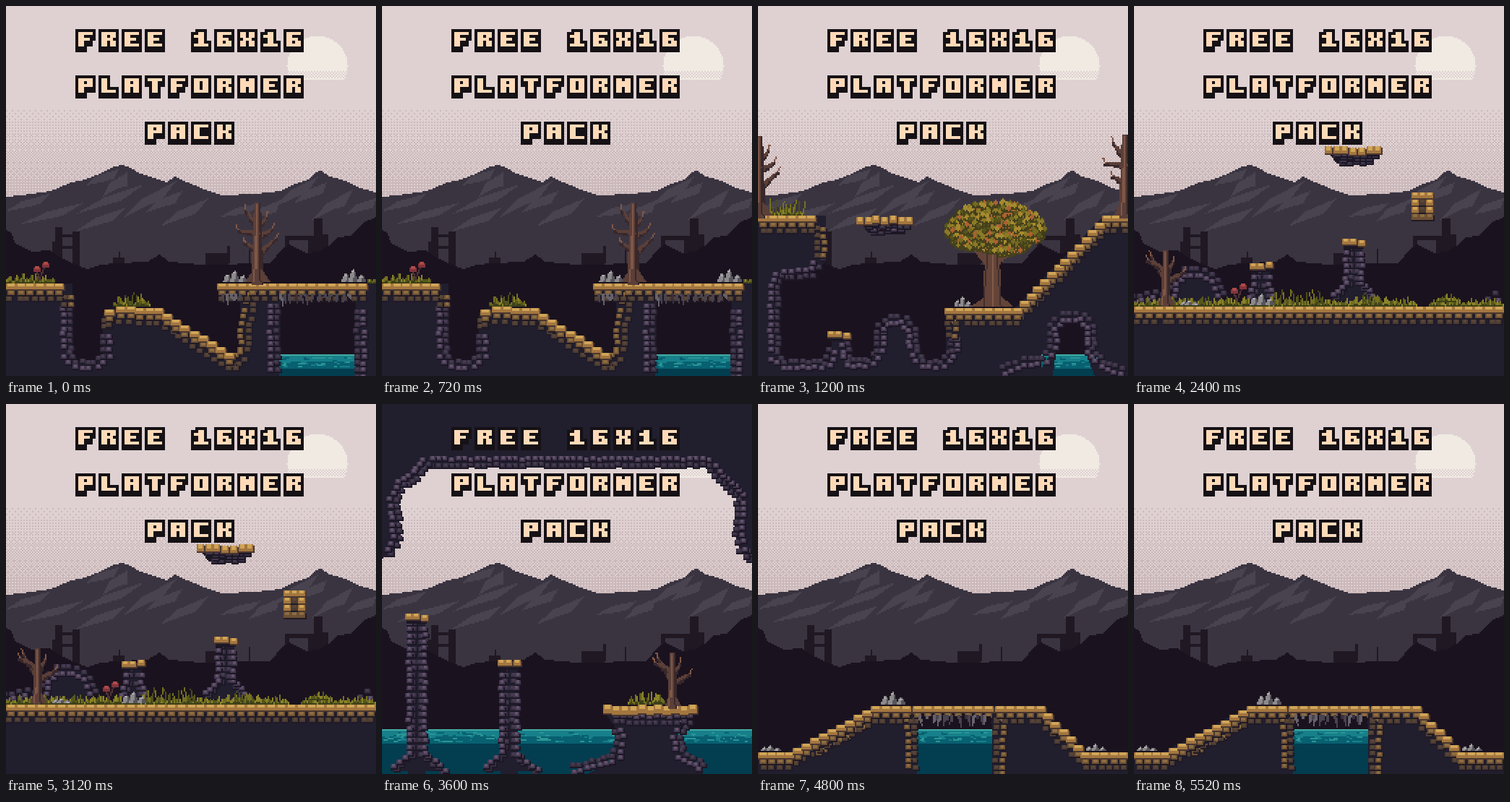
Recreate the animation shown at these times as an HTML page with a canvas. Size 512 px wide and 512 px high, loop 6 s.

```html
<!DOCTYPE html>
<html lang="en">
<meta charset="utf-8">
<title>Free 16x16 platformer pack</title>
<style>
html, body { margin: 0; width: 100%; height: 100%; overflow: hidden; background: #1a121e }
canvas { display: block; width: 512px; height: 512px; image-rendering: pixelated }
</style>
<canvas width="256" height="256" role="img" aria-label="FREE 16X16 PLATFORMER PACK"></canvas>
<script>
const ctx = document.querySelector('canvas').getContext('2d');
const DARK = '#1a121e', EARTH = '#211e2e';
const GOLD = ['#49362f', '#a3763f', '#d0a557'];
const BROWN = ['#211a23', '#6b5035', '#8d6c40'];
const UMBER = ['#1f1a26', '#4a3b34', '#594536'];
const VIOLET = ['#1c1625', '#43384e', '#62526c'];
const SHADE = ['#1c1825', '#352d40', '#463b50'];

let seed;
const rnd = () => (seed = seed * 16807 % 2147483647) / 2147483647;
const pick = list => list[Math.floor(rnd() * list.length)];

function R(color, x, y, w, h) {
  ctx.fillStyle = color;
  ctx.fillRect(Math.round(x), Math.round(y), Math.round(w), Math.round(h));
}

// Scanline fill, so that edges stay hard
function poly(color, p) {
  for (let y = 0; y < 256; y++) {
    const cuts = [];
    for (let i = 0; i < p.length; i += 2) {
      const [x0, y0] = [p[i], p[i + 1]];
      const [x1, y1] = [p[(i + 2) % p.length], p[(i + 3) % p.length]];
      if (y0 <= y + .5 !== y1 <= y + .5) cuts.push(x0 + (y + .5 - y0) / (y1 - y0) * (x1 - x0));
    }
    cuts.sort((a, b) => a - b);
    for (let i = 0; i < cuts.length; i += 2) {
      const x = Math.round(cuts[i]);
      R(color, x, y, Math.round(cuts[i + 1]) - x, 1);
    }
  }
}

function walk(p, step, draw) {
  for (let i = 0; i + 3 < p.length; i += 2) {
    const dx = p[i + 2] - p[i], dy = p[i + 3] - p[i + 1];
    const len = Math.hypot(dx, dy), n = Math.max(1, Math.round(len / step));
    for (let k = 0; k < n; k++)
      draw(p[i] + dx * k / n, p[i + 1] + dy * k / n, -dy / len, dx / len);
  }
}

function limb(color, w0, w1, x0, y0, x1, y1) {
  const n = Math.ceil(Math.hypot(x1 - x0, y1 - y0)) || 1;
  for (let i = 0; i <= n; i++) {
    const k = i / n, w = Math.max(1, Math.round(w0 + (w1 - w0) * k));
    R(color, x0 + (x1 - x0) * k - w / 2, y0 + (y1 - y0) * k, w, Math.min(w, 3));
  }
}

function stone(x, y, w, h, [low, mid, high]) {
  R(low, x, y + 1, w, h - 1);
  R(mid, x, y, w - 1, h - 1);
  R(high, x + 1, y, w - 3, Math.max(1, h >> 1));
}

// Double row of stones along a line
function wall(p, pal = VIOLET, w = 9) {
  const inner = pal === VIOLET ? SHADE : UMBER;
  for (const [off, tone] of [[-w / 4, inner], [w / 4, pal]])
    walk(p, 4.5, (x, y, nx, ny) =>
      stone(x + nx * off - 2.5 + rnd(), y + ny * off - 2 + rnd(), 5, 4, tone));
}

// Walkable edge: gold on top, darker stones beneath
function ledge(p) {
  walk(p, 6, (x, y) => stone(x + rnd() * 2, y + 9, 5, 4, UMBER));
  walk(p, 7, (x, y) => stone(x + 1, y + 5, 6, 4, BROWN));
  walk(p, 7, (x, y) => stone(x, y, 8, 5, GOLD));
}

function cap(x, y, w) {
  R(VIOLET[0], x + 1, y + 4, w - 2, 3);
  walk([x, y, x + w, y], 5.5, (a, b) => stone(a, b + rnd(), 6, 5, GOLD));
}

function pillar(x, y, bottom, flare) {
  R(EARTH, x - 6, y + 4, 12, bottom - y);
  if (flare) poly(EARTH, [x - 4, bottom - 14, x + 4, bottom - 14, x + flare, bottom, x - flare, bottom]);
  wall([x - 4, y + 6, x - 4, bottom - 12, x - flare, bottom], VIOLET, 5);
  wall([x + flare, bottom, x + 4, bottom - 12, x + 4, y + 6], VIOLET, 5);
  cap(x - 8, y, 16);
}

function floating(x, y) {
  poly(SHADE[0], [x + 1, y + 3, x + 38, y + 3, x + 32, y + 13, x + 8, y + 13]);
  wall([x + 31, y + 11, x + 8, y + 11], VIOLET, 5);
  wall([x + 35, y + 7, x + 4, y + 7], VIOLET, 4);
  walk([x, y + 1, x + 40, y + 1], 6, (a, b) => stone(a, b + rnd(), 6, 6, GOLD));
}

function grass(x0, x1, y, tall = 4) {
  for (let x = x0; x < x1; x++) {
    const edge = Math.min(1, (x - x0 + 1) / 5, (x1 - x) / 5);
    const h = 1 + edge * rnd() * tall;
    R('#3d4019', x, y - h / 2, 1, h / 2 + 1);
    R(pick(['#55571c', '#74701f', '#8c8429']), x, y - h, 1, h * .6 + 1);
  }
}

function reeds(x0, x1, y, h) {
  for (let x = x0; x < x1; x += 2 + rnd() * 2)
    limb(pick(['#4c4c1c', '#74701f']), 1, 1, x, y, x + rnd() * 4 - 2, y - h * (.5 + rnd() / 2));
}

function flowers(x, y) {
  for (const [dx, h] of [[0, 8], [6, 11]]) {
    limb('#4e3338', 1, 1, x + 2, y, x + dx, y - h);
    R('#82343b', x + dx - 2, y - h, 5, 3);
    R('#b04a49', x + dx - 1, y - h - 1, 3, 2);
  }
}

function rocks(x, y, w, h) {
  for (const [at, s] of [[0, .7], [.35, 1], [.75, .6]]) {
    const l = x + w * at - w * .15, t = y - h * s, d = w * .5;
    poly('#56545c', [l, y, l + d * .3, t + 1, l + d * .6, t, l + d, y]);
    poly('#8d8a8c', [l, y, l + d * .3, t + 1, l + d * .6, t, l + d * .5, y]);
    R('#b0adae', l + d * .35, t + 1, 2, 1);
  }
}

// Branches: start height, reach, end height, as parts of the tree height
const TALL = [[.36, .24, .56], [.42, -.16, .5], [.58, .19, .68], [.64, -.25, .66], [.72, -.15, .92], [.7, .12, .84]];
const SMALL = [[.5, -.28, .93], [.68, -.34, .84], [.45, .34, .62], [.58, .14, .82]];

function deadTree(x, y, h, branches) {
  const bark = '#5b3f38', lit = '#805747', dim = '#38282b';
  for (const [a, dx, b] of branches) {
    limb(dim, 3, 2, x, y - h * a + 1, x + dx * h, y - h * b + 1);
    limb(bark, 3, 1, x, y - h * a, x + dx * h, y - h * b);
    limb(lit, 1, 1, x + dx * h, y - h * b, x + dx * h * 1.1, y - h * b - 3);
  }
  limb(dim, h * .15, 4, x, y, x, y - h);
  limb(bark, h * .13, 3, x - 1, y, x - 1, y - h);
  limb(lit, h * .04, 1, x - 1, y - 2, x - 1, y - h + 1);
  poly(bark, [x - h * .15, y + 1, x - 3, y - h * .15, x + 3, y - h * .15, x + h * .17, y + 1]);
  limb(dim, 1, 1, x + 2, y, x + 1, y - h * .6);
  limb(lit, 1, 1, x - 3, y, x - 1, y - h * .3);
}

function leafyTree(x, y) {
  const bark = '#644438';
  poly(bark, [x - 15, y, x - 6, y - 6, x - 5, y - 45, x + 5, y - 45, x + 6, y - 7, x + 15, y]);
  for (const dx of [-16, -8, 9, 18]) limb(bark, 4, 2, x, y - 28, x + dx, y - 46);
  for (const dx of [-3, 0, 3]) limb(dx ? '#422e2e' : '#825b48', 1, 1, x + dx * 2, y - 1, x + dx, y - 40);
  for (let i = 0; i < 1100; i++) {
    const a = rnd() * Math.PI * 2, d = Math.sqrt(rnd());
    const lx = x + 1 + Math.cos(a) * d * 34, s = Math.sin(a) * d;
    const ly = y - 54 + s * (s < 0 ? 20 : 15 + 2 * Math.cos(a * 5));
    const leaf = i < 350 ? '#3b3a1b' : pick(['#57541d', '#756b21', '#8c7a26', '#a58a30', '#ac6132']);
    R('#45401c', lx, ly + 1, 3, 3);
    R(leaf, lx, ly, 3, 2);
    R(leaf, lx + 1, ly - 1, 1, 4);
  }
}

function water(x, y, w) {
  R('#033d50', x, y, w, 256 - y);
  R('#086070', x, y, w, 10);
  R('#17808a', x, y, w, 5);
  R('#43aaa2', x, y, w, 1);
  for (let i = 0; i < w; i++)
    R(pick(['#086070', '#2a9695', '#17808a']), x + rnd() * (w - 5), y + 2 + Math.floor(rnd() * 7), 2 + rnd() * 3, 1);
}

function hanging(x0, x1, y) {
  for (let x = x0; x < x1; x += 2 + rnd() * 3) {
    const h = 2 + rnd() * 6;
    limb(pick(['#66616a', '#48434e', '#39303f']), 2, 1, x, y, x + rnd() * 4 - 2, y + h);
  }
}

function backdrop() {
  R('#dfd1d2', 0, 0, 256, 256);
  for (let y = 72; y < 134; y++)
    for (let x = 0; x < 256; x++) {
      const m = x ^ y, level = (m & 1) << 3 | (y & 1) << 2 | m & 2 | (y & 2) >> 1;
      if (level < (y - 66) / 5) R('#cbb8ba', x, y, 1, 1);
    }
  for (let y = 21; y < 51; y++) {
    const half = Math.round(Math.sqrt(20.5 ** 2 - (y - 41) ** 2));
    for (let x = 215 - half; x < 215 + half + 1; x++)
      if (y < 45 || y === 50 || (x + y) % 2) R('#f0eae3', x, y, 1, 1);
  }
  poly('#3a3441', [0, 132, 10, 131, 31, 128, 45, 122, 55, 120, 65, 116, 75, 111, 80, 110, 86, 112, 93, 116,
    102, 119, 111, 122, 117, 118, 123, 121, 140, 128, 150, 131, 172, 130, 190, 128, 200, 123, 209, 120,
    214, 115, 218, 114, 224, 118, 235, 121, 245, 126, 256, 129, 256, 190, 0, 190]);
  const streaks = [[78, 113, 55, 124], [84, 115, 67, 132], [96, 123, 48, 144], [118, 121, 80, 147], [122, 128, 96, 143],
    [140, 133, 106, 153], [177, 136, 148, 146], [216, 118, 184, 140], [222, 122, 200, 136], [240, 127, 212, 148],
    [30, 130, 0, 142], [54, 136, 10, 151], [256, 133, 236, 144], [84, 139, 48, 156], [190, 134, 168, 149]];
  for (const [x0, y0, x1, y1] of streaks) {
    const mx = (x0 + x1) / 2 + 3, my = (y0 + y1) / 2;
    poly('#48434e', [x0, y0, mx + 5, my + 1, mx - 2, my + 3, x1, y1, mx - 7, my - 1]);
  }
  for (const [x, y, w, h] of [[34, 153, 5, 25], [46, 156, 5, 25], [35, 158, 14, 2], [35, 166, 14, 2], [32, 163, 3, 15],
    [74, 174, 8, 6], [78, 170, 1, 6], [138, 171, 16, 9], [153, 166, 2, 12], [168, 168, 1, 12],
    [193, 159, 20, 3], [193, 160, 3, 18], [209, 161, 5, 15], [213, 147, 6, 28], [219, 158, 4, 15]])
    R('#201822', x, y, w, h);
  poly(DARK, [0, 155, 4, 157, 6, 164, 18, 170, 30, 169, 36, 173, 46, 178, 56, 182, 66, 179, 76, 178, 98, 177, 106, 172,
    113, 177, 136, 179, 183, 178, 190, 169, 196, 165, 208, 171, 216, 170, 223, 166, 229, 160, 238, 159,
    247, 150, 256, 146, 256, 256, 0, 256]);
}

const scenes = [
  () => {
    poly(EARTH, [0, 192, 46, 192, 46, 246, 67, 246, 67, 212, 72, 209, 100, 209, 150, 241, 162, 241, 162, 204,
      146, 196, 146, 192, 256, 192, 256, 256, 0, 256]);
    R(DARK, 190, 200, 52, 56);
    water(189, 241, 53);
    wall([42, 209, 42, 241, 48, 248, 62, 248, 69, 242, 69, 224]);
    wall([185, 207, 185, 256]);
    wall([245, 256, 245, 207]);
    wall([70, 222, 70, 213], BROWN);
    wall([43, 207, 43, 196], BROWN);
    wall([170, 196, 166, 220, 164, 242, 152, 249], BROWN, 11);
    ledge([68, 210, 76, 208, 102, 209, 151, 240, 161, 240]);
    ledge([0, 192, 40, 192]);
    ledge([146, 192, 250, 192]);
    hanging(150, 162, 199);
    hanging(190, 242, 199);
    grass(0, 34, 191, 5);
    grass(74, 100, 207, 6);
    reeds(80, 97, 205, 8);
    flowers(21, 189);
    rocks(152, 191, 14, 8);
    rocks(234, 191, 14, 9);
    deadTree(174, 190, 54, TALL);
    grass(250, 256, 191, 4);
  },
  () => {
    poly(EARTH, [0, 145, 47, 145, 47, 176, 40, 184, 14, 188, 14, 244, 20, 247, 50, 246, 51, 229, 62, 229, 62, 246, 78, 246,
      84, 232, 90, 217, 102, 217, 108, 234, 114, 247, 130, 246, 130, 209, 178, 209, 239, 145, 256, 145, 256, 256, 0, 256]);
    poly(DARK, [206, 246, 206, 224, 210, 220, 224, 220, 227, 226, 227, 246]);
    water(196, 241, 40);
    poly(EARTH, [192, 256, 204, 239, 206, 241, 204, 256]);
    poly(EARTH, [227, 241, 230, 241, 242, 256, 233, 256]);
    wall([43, 174, 38, 184, 14, 186, 11, 194, 11, 242, 18, 248, 48, 248, 52, 234]);
    wall([60, 234, 62, 247, 78, 247, 84, 238, 85, 222, 92, 217, 101, 217, 106, 224, 108, 240, 114, 248, 128, 248, 136, 238, 136, 226]);
    wall([170, 252, 184, 246, 198, 245, 204, 236, 204, 222, 211, 215, 224, 215, 230, 222, 230, 238, 238, 248, 256, 254]);
    wall([43, 172, 43, 150], BROWN);
    wall([134, 228, 134, 214], BROWN);
    cap(48, 225, 16);
    ledge([0, 145, 40, 145]);
    ledge([129, 209, 176, 209, 238, 145, 256, 145]);
    floating(68, 144);
    grass(5, 32, 144, 5);
    reeds(9, 32, 143, 10);
    deadTree(1, 144, 54, TALL);
    deadTree(254, 144, 55, TALL);
    rocks(137, 208, 10, 7);
    rocks(169, 208, 6, 4);
    leafyTree(162, 208);
  },
  () => {
    poly(EARTH, [26, 206, 27, 192, 34, 184, 50, 184, 58, 192, 60, 206]);
    wall([0, 203, 14, 200, 24, 204, 28, 191, 35, 184, 48, 184, 56, 190, 61, 204]);
    wall([246, 204, 256, 199]);
    R(EARTH, 0, 208, 256, 48);
    pillar(88, 177, 205, 8);
    pillar(152, 161, 204, 16);
    grass(0, 196, 207, 5);
    grass(204, 256, 207, 4);
    grass(210, 223, 204, 5);
    reeds(96, 130, 205, 9);
    reeds(158, 172, 205, 6);
    deadTree(22, 206, 37, SMALL);
    rocks(33, 207, 11, 4);
    rocks(82, 207, 14, 8);
    flowers(69, 204);
    ledge([0, 208, 256, 208]);
    floating(132, 96);
    R(EARTH, 193, 130, 14, 17);
    for (const y of [129, 134, 139, 144])
      for (const x of [192, 197, 202])
        stone(x, y, 6, 5, x === 197 && y > 130 && y < 144 ? UMBER : y < 144 ? GOLD : BROWN);
  },
  () => {
    poly(EARTH, [0, 0, 256, 0, 256, 106, 248, 103, 244, 90, 245, 64, 238, 58, 230, 48, 224, 42, 32, 42, 25, 52, 14, 58,
      11, 70, 13, 92, 8, 104, 0, 107]);
    wall([256, 105, 249, 101, 247, 90, 248, 64, 240, 56, 232, 48, 226, 40, 30, 40, 23, 49, 13, 55, 8, 66, 10, 92, 5, 102, 0, 105]);
    water(0, 225, 256);
    pillar(24, 145, 254, 19);
    pillar(88, 177, 254, 19);
    poly(EARTH, [153, 212, 217, 212, 205, 226, 207, 242, 222, 250, 222, 256, 142, 256, 160, 246, 163, 226]);
    wall([132, 252, 150, 248, 162, 244, 165, 230, 162, 222]);
    wall([208, 222, 204, 230, 206, 242, 218, 248, 224, 255]);
    wall([213, 218, 157, 218]);
    walk([153, 208, 218, 208], 6, (x, y) => stone(x, y + rnd(), 7, 7, GOLD));
    grass(170, 196, 207, 7);
    deadTree(201, 208, 36, SMALL);
  },
  () => {
    poly(EARTH, [0, 241, 20, 241, 80, 209, 193, 209, 224, 241, 256, 241, 256, 256, 0, 256]);
    R(DARK, 110, 214, 52, 20);
    water(110, 225, 52);
    wall([106, 214, 106, 256], BROWN);
    wall([167, 256, 167, 214], BROWN);
    wall([40, 240, 76, 219], BROWN);
    ledge([0, 241, 18, 241, 78, 209, 192, 209, 223, 241, 256, 241]);
    R(DARK, 111, 216, 50, 9);
    hanging(112, 161, 215);
    rocks(87, 208, 14, 9);
    rocks(3, 240, 12, 4);
    rocks(228, 240, 12, 5);
  }
];

// Letters are built from bars on a 5 by 5 grid: x, y, width, height
const BARS = {
  l: [0, 0, 2, 5], r: [3, 0, 2, 5], t: [0, 0, 5, 1], m: [0, 2, 4, 1], b: [0, 4, 5, 1],
  u: [3, 0, 2, 2], d: [3, 3, 2, 2], c: [1.5, 0, 2, 5], n: [0, 1, 2, 1], a: [0, 0, 2, 2],
  e: [0, 3, 2, 2], x: [1, 2, 3, 1], w: [0, 1, 5, 2], p: [3, 0, 2, 3]
};
const LETTERS = {
  F: 'ltm', R: 'ltmud', E: 'ltmb', 1: 'cnb', 6: 'ltmbdx', X: 'auxed', P: 'ltmp',
  L: 'lb', A: 'ltmr', T: 'tc', O: 'ltbr', M: 'lrw', C: 'ltb', K: 'lmud'
};

function title(text, x, y) {
  const each = draw => [...text].forEach((ch, i) => {
    for (const bar of LETTERS[ch] || '') draw(x + i * 16, ...BARS[bar]);
  });
  each((left, bx, by, w, h) => R('#151115', left + bx * 2, y + by * 2, w * 2 + 4, h * 2 + 6));
  each((left, bx, by, w, h) => R('#ffdab8', left + 2 + bx * 2, y + 2 + by * 2, w * 2, h * 2));
}

let shown = -1;
function tick() {
  const now = Math.floor(performance.now() % 6000 / 1200);
  if (now !== shown) {
    shown = now;
    seed = 4711;
    backdrop();
    scenes[now]();
    title('FREE 16X16', 48, 16);
    title('PLATFORMER', 48, 48);
    title('PACK', 96, 80);
  }
  requestAnimationFrame(tick);
}
tick();
</script>
</html>
```
